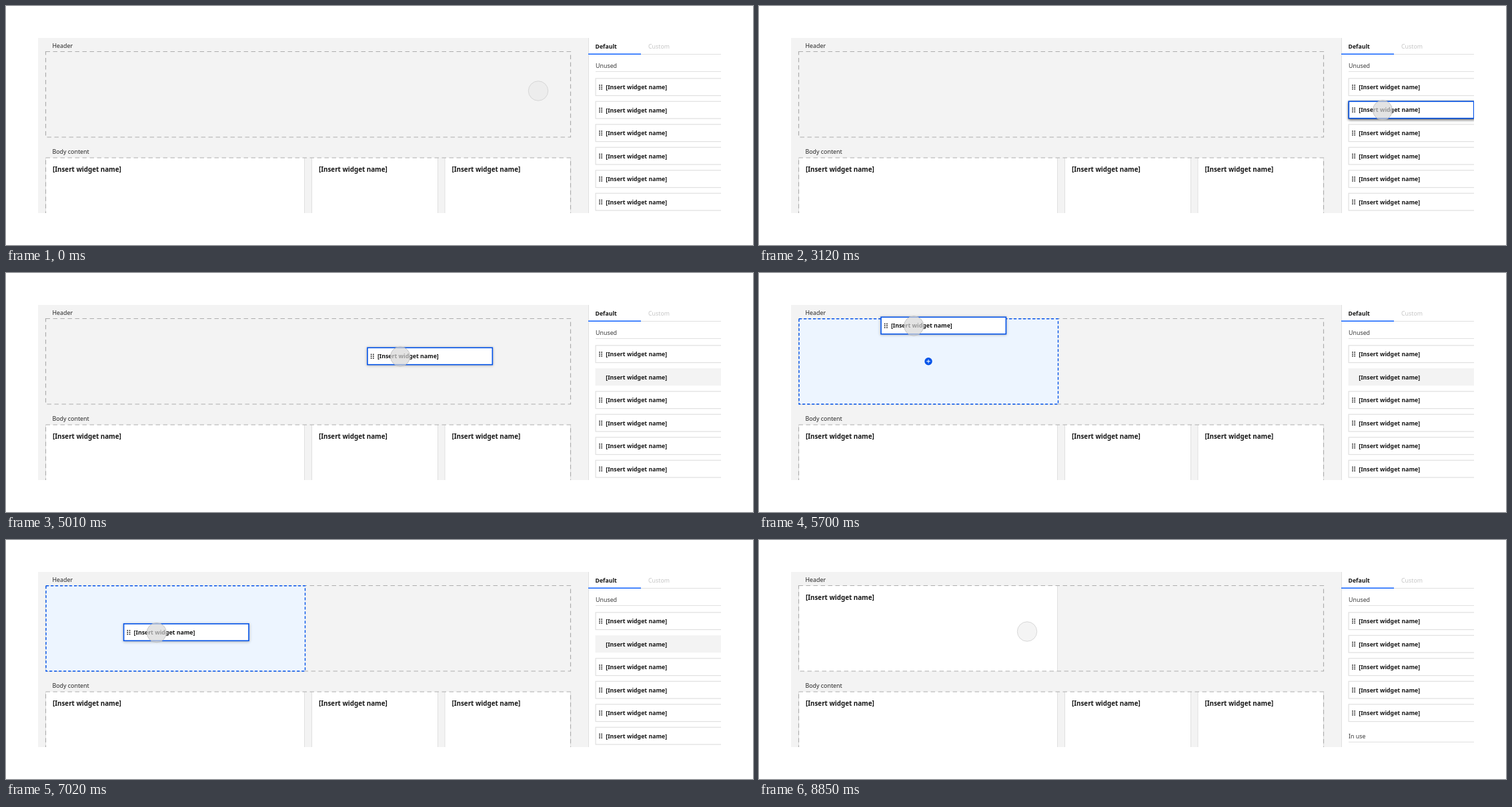
Recreate the animation shown at these times as an HTML page with a canvas. Size 1120x359 px, loop 8910 ms.

```html
<!DOCTYPE html>
<html lang="en">
<head>
<meta charset="utf-8">
<title>Widget drag and drop</title>
<style>
html, body { margin: 0; width: 100%; height: 100%; overflow: hidden; background: #fff; }
canvas { display: block; width: 1120px; height: 359px; }
</style>
</head>
<body>
<canvas id="stage" width="1120" height="359"></canvas>
<script>
const ctx = document.getElementById('stage').getContext('2d');
const LOOP = 8910;
const BLUE = '#0f62fe', DEEP = '#0353e9', INK = '#161616', LINE = '#e0e0e0', CANVAS = '#f3f3f3';
const FONT = '"Noto Sans", "Open Sans", sans-serif';
const NAME = '[Insert widget name]';
const HOVER = 840, PRESS = 2520, DRAG = 3555, ENTER = 5170, DROP = 7290;
const ROW_X = 884, ROW_H = 26, PITCH = 34.5;

// Pointer path: time, x, y
const path = [
  [0, 798, 127.5], [930, 890, 152], [1860, 928, 153.5], [2010, 935, 154],
  [2550, 943, 156], [2790, 942, 156.5], [3120, 935, 156.5], [3540, 935, 156.5],
  [4140, 885.5, 156.5], [4440, 734, 143], [5010, 591.5, 125.5], [5400, 304, 75.5],
  [5950, 208.5, 86], [6330, 210, 103], [6480, 211.6, 112.6], [7230, 230, 144.5],
  [7290, 230.5, 145], [8160, 230.5, 145], [8850, 402, 137.5], [LOOP, 402, 137.5]
];

const clamp = v => Math.max(0, Math.min(1, v));
const ramp = (t, start, len) => clamp((t - start) / len);
const ease = p => p < 0.5 ? 2 * p * p : 1 - 2 * (1 - p) * (1 - p);
const mix = (a, b, p) => a + (b - a) * p;

function slope(i, k) {
  if (i === 0 || i === path.length - 1) return 0;
  const [a, b, c] = [path[i - 1], path[i], path[i + 1]];
  const m = (b[k] - a[k]) / (b[0] - a[0]);
  const n = (c[k] - b[k]) / (c[0] - b[0]);
  return m * n <= 0 ? 0 : 2 * m * n / (m + n);
}

// Monotone cubic interpolation along the path
function along(t, k) {
  let i = 0;
  while (i < path.length - 2 && t >= path[i + 1][0]) i++;
  const a = path[i], b = path[i + 1], h = b[0] - a[0];
  const p = clamp((t - a[0]) / h), q = 1 - p;
  return a[k] * (1 + 2 * p) * q * q + b[k] * p * p * (3 - 2 * p)
    + h * p * q * (slope(i, k) * q - slope(i + 1, k) * p);
}

function fill(x, y, w, h, color) {
  ctx.fillStyle = color;
  ctx.fillRect(x, y, w, h);
}

function text(str, x, y, color = INK, weight = 400, size = 8.85) {
  ctx.font = `${weight} ${size}px ${FONT}`;
  ctx.fillStyle = color;
  ctx.fillText(str, x, y);
}

function dashed(x, y, w, h, color, width, pattern) {
  ctx.save();
  ctx.strokeStyle = color;
  ctx.lineWidth = width;
  ctx.setLineDash(pattern);
  ctx.strokeRect(x, y, w, h);
  ctx.restore();
}

function faded(alpha, draw) {
  if (alpha <= 0) return;
  ctx.save();
  ctx.globalAlpha = alpha;
  draw();
  ctx.restore();
}

function zone(y, h) {
  dashed(59.5, y, 787, h, '#adadad', 1.2, [6.5, 4.5]);
}

function widget(x, y, w, h) {
  fill(x, y, w, h, LINE);
  fill(x + 1, y, w - 2, h, '#fff');
  text(NAME, x + 11, y + 21, INK, 600, 9.8);
}

function label(x, y) {
  text(NAME, x + 15.3, y + 16.4, INK, 600, 8.75);
}

function content(x, y) {
  for (let i = 0; i < 6; i++) {
    fill(x + 5.2 + (i % 2) * 3.2, y + 9.6 + (i >> 1) * 2.8, 1.6, 1.6, INK);
  }
  label(x, y);
}

function box(x, y, w, h, border, width, shadow) {
  ctx.save();
  if (shadow) {
    ctx.shadowColor = `rgba(0,0,0,${shadow})`;
    ctx.shadowBlur = 4;
    ctx.shadowOffsetY = 1;
  }
  fill(x, y, w, h, border);
  ctx.restore();
  fill(x + width, y + width, w - 2 * width, h - 2 * width, '#fff');
}

function row(y) {
  box(ROW_X - 0.5, y - 0.5, 200, ROW_H + 1, LINE, 1.2);
  content(ROW_X, y);
}

function heading(str, y) {
  text(str, ROW_X, y, '#393939');
  fill(ROW_X, Math.round(y + 5), 190, 1, LINE);
}

const rowTop = i => 108.7 + PITCH * i;

function panel(t) {
  fill(873, 48, 200, 263, '#fff');
  fill(873, 48, 1, 263, LINE);
  text('Default', 883.5, 63.8, INK, 600, 8.7);
  text('Custom', 963, 63.8, '#c6c6c6');
  fill(951, 72, 122, 1, LINE);
  fill(873, 71.5, 79, 1.5, BLUE);
  heading('Unused', 93);

  const p = ease(ramp(t, DROP, 625));
  for (let i = 0; i < 6; i++) {
    if (i === 1) continue;
    row(mix(rowTop(i), rowTop(i > 1 ? i - 1 : i), p));
  }
  heading('In use', mix(332.3, 297.8, p));

  if (t < DRAG) {
    const top = rowTop(1);
    row(top);
    faded(ramp(t, HOVER, 90), () => {
      box(ROW_X - 0.5, top - 0.5, 200, ROW_H + 1, '#858585', 1.2, 0.45);
      content(ROW_X, top);
    });
  } else {
    const y = mix(rowTop(1), 317.5, p);
    fill(ROW_X - 0.5, y, 190, ROW_H, CANVAS);
    label(ROW_X, y);
  }
}

function board(t) {
  fill(48, 48, 825, 263, CANVAS);
  text('Header', 69.5, 63.2, '#262626');
  text('Body content', 69.5, 222.3, '#262626');

  const dropped = ramp(t, DROP, 60);
  faded(dropped, () => widget(59, 69, 389, 128));
  zone(68.5, 128.5);

  widget(59, 228, 389, 90);
  widget(458, 228, 190, 90);
  widget(657.5, 228, 189.5, 90);
  zone(228, 120);

  faded(ramp(t, ENTER, 90) * (1 - dropped), () => {
    fill(59.5, 68.5, 389, 128.5, '#edf5ff');
    dashed(60, 68.7, 388.5, 128.3, DEEP, 1.4, [4.2, 2.8]);
    ctx.fillStyle = DEEP;
    ctx.beginPath();
    ctx.arc(254, 132.7, 5.7, 0, 7);
    ctx.fill();
    fill(251.2, 132.2, 5.6, 1, '#fff');
    fill(253.5, 129.9, 1, 5.6, '#fff');
  });
}

function dragCard(t, px, py) {
  const x = t < DRAG ? 883.5 : Math.min(883.5, px - 50);
  const y = t < DRAG ? 142.5 : py - 14;
  faded(ramp(t, PRESS, 180) * (1 - ramp(t, DROP, 60)), () => {
    box(x, y, 189, 27, DEEP, 1.6, 0.3);
    content(x + 0.5, y + 0.5);
  });
}

function pointer(t, x, y) {
  const p = ramp(t, 2800, 320) * (1 - ramp(t, DROP, 90));
  const c = mix(227, 214, p), edge = mix(208, 188, p);
  ctx.beginPath();
  ctx.arc(x, y, 14.7, 0, 7);
  ctx.fillStyle = `rgba(${c},${c},${c},${mix(0.4, 0.68, p)})`;
  ctx.fill();
  ctx.strokeStyle = `rgb(${edge},${edge},${edge})`;
  ctx.lineWidth = 0.8;
  ctx.stroke();
}

function draw(t) {
  const x = along(t, 1), y = along(t, 2);
  fill(0, 0, 1120, 359, '#fff');
  ctx.save();
  ctx.beginPath();
  ctx.rect(48, 48, 1024, 263);
  ctx.clip();
  board(t);
  panel(t);
  dragCard(t, x, y);
  pointer(t, x, y);
  ctx.restore();
}

const start = performance.now();
function tick() {
  draw((performance.now() - start) % LOOP);
  requestAnimationFrame(tick);
}
tick();
</script>
</body>
</html>
```
